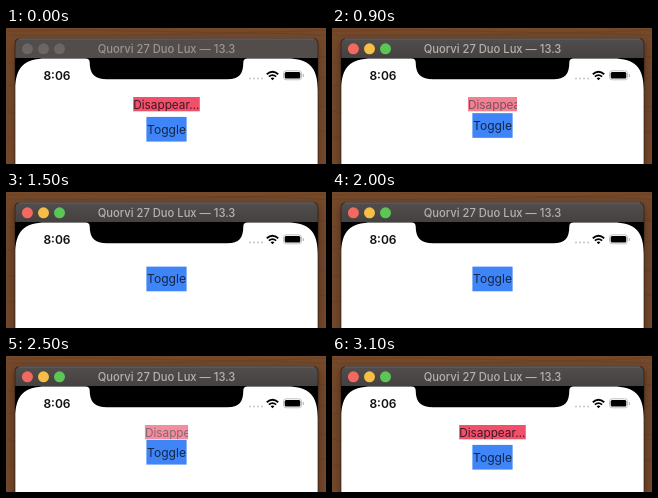
These frames come from a looping animation (320x136 px, 3300 ms). An HTML page:

```html
<!DOCTYPE html>
<html lang="en">
<head>
<meta charset="utf-8">
<title>Toggle transition</title>
<style>
  html, body { margin: 0; width: 100%; height: 100%; overflow: hidden; background: #6b4529; }
  svg { display: block; width: 100vw; height: 100vh; font-family: Inter, Roboto, sans-serif; }
  .bar { fill: #524c4a; }
  .title { fill: #9a9492; font-size: 11.2px; font-weight: 500; text-anchor: middle; }
  .light { fill: #6b6563; }
  .shadow { opacity: .2; }
  .active .bar { fill: url(#barFill); }
  .active .title { fill: #b5b1af; }
  .active .light { fill: var(--c); }
  .active .shadow { opacity: .35; }
  .clock { font-size: 12px; font-weight: 600; fill: #111; }
  .label { font-size: 11.8px; fill: #3d1a26; }
  .toggle { font-size: 12.1px; fill: #12274a; text-anchor: middle; }
</style>
</head>
<body>
<svg id="stage" viewBox="0 0 320 136" preserveAspectRatio="none">
  <defs>
    <linearGradient id="wood" x2="0" y2="1">
      <stop offset="0" stop-color="#75492a"/>
      <stop offset=".5" stop-color="#70482c"/>
      <stop offset="1" stop-color="#75492b"/>
    </linearGradient>
    <linearGradient id="barFill" x2="0" y2="1">
      <stop offset="0" stop-color="#524e4d"/>
      <stop offset="1" stop-color="#454140"/>
    </linearGradient>
    <filter id="blur" x="-10%" y="-20%" width="120%" height="140%">
      <feGaussianBlur stdDeviation="4"/>
    </filter>
    <clipPath id="labelClip"><rect id="clip" y="69" height="14.600"/></clipPath>
  </defs>

  <rect width="320" height="136" fill="url(#wood)"/>
  <g fill="none" stroke="#4c2f1c" stroke-opacity=".3" stroke-width=".8">
    <path d="M0 3Q80 1 160 3.500T320 2M0 7Q100 8 190 6T320 7.500"/>
    <path d="M0 34l9 2M0 58l9-1M0 83l9 2M0 110l9-1M312 28l8 1M312 51l8-2M312 78l8 1M312 104l8-1"/>
  </g>
  <rect class="shadow" x="8" y="13" width="305" height="140" rx="5" fill="#1c0f08" filter="url(#blur)"/>
  <rect x="8.700" y="9.900" width="303.600" height="140" rx="5.500" fill="#1b1411"/>

  <path class="bar" d="M9.300 30V15.500a5 5 0 0 1 5-5H306.700a5 5 0 0 1 5 5V30z"/>
  <path d="M13 10.900H308" stroke="#7d7674" stroke-width=".7"/>
  <g>
    <circle class="light" style="--c:#f2695f" cx="21.400" cy="20.800" r="5.500"/>
    <circle class="light" style="--c:#f6be46" cx="37.500" cy="20.800" r="5.500"/>
    <circle class="light" style="--c:#5bc655" cx="53.500" cy="20.800" r="5.500"/>
  </g>
  <text class="title" x="160.500" y="25.400">Quorvi 27 Duo Lux — 13.3</text>

  <path d="M9.300 30H311.700V136H9.300z"/>
  <path fill="#fff" d="M9.300 136V62C9.300 39 18 30.500 40 30.500H79.500Q83.700 30.500 83.700 34.500C83.700 46.300 89 51.300 101 51.300H221.500C233 51.300 237.300 46.300 237.300 34.500Q237.300 30.500 241.500 30.500H281C303 30.500 311.700 39 311.700 62V136z"/>

  <text class="clock" x="37.400" y="51.500">8:06</text>
  <g fill="#c4c4c4">
    <circle cx="244" cy="50.500" r="1"/><circle cx="248" cy="50.500" r="1"/>
    <circle cx="252" cy="50.500" r="1"/><circle cx="256" cy="50.500" r="1"/>
  </g>
  <g fill="none" stroke="#000" stroke-width="1.800">
    <path d="M260.800 46.300Q266.500 41.300 272.200 46.300M262.900 48.700Q266.500 45.500 270.100 48.700"/>
    <path d="M264.600 50.200Q266.500 48.600 268.400 50.200L266.500 52.200z" fill="#000" stroke="none"/>
    <rect x="277.500" y="42.800" width="18" height="9" rx="2.600" stroke="#bbb" stroke-width=".9"/>
    <path d="M297.300 46v3" stroke="#bbb" stroke-width="1.200"/>
  </g>
  <rect x="278.700" y="44" width="15.600" height="6.600" rx="1.500"/>

  <g id="banner" clip-path="url(#labelClip)">
    <rect x="120" y="69" width="80" height="14.600" fill="#f2506a"/>
    <text id="label" class="label" y="80.500">Disappear…</text>
  </g>
  <g id="button">
    <rect x="140.400" width="40.200" height="24.700" fill="#3f85f7"/>
    <text class="toggle" x="160.500" y="16.900">Toggle</text>
  </g>
</svg>
<script>
  const LOOP = 3300, TICK = 100, MOVE = 700;
  const HIDE = 665, SHOW = 2080, ACTIVATE = 600;
  const CENTER = 160.5, WIDTH = 66.6;
  const $ = id => document.getElementById(id);
  const stage = $('stage'), clip = $('clip'), banner = $('banner');
  const label = $('label'), button = $('button');

  function ease(time, start) {
    const x = Math.min(1, Math.max(0, (time - start) / MOVE));
    return x * x * (3 - 2 * x);
  }

  function draw(now) {
    const time = Math.floor(now % LOOP / TICK) * TICK;
    const shown = 1 - ease(time, HIDE) + ease(time, SHOW);
    const width = WIDTH * shown;
    const left = CENTER - width / 2;
    stage.classList.toggle('active', time >= ACTIVATE);
    clip.setAttribute('x', left);
    clip.setAttribute('width', width);
    label.setAttribute('x', left);
    banner.setAttribute('opacity', shown);
    button.setAttribute('transform', `translate(0 ${74.6 + 14.3 * shown})`);
  }

  const begin = performance.now();
  function loop() {
    draw(performance.now() - begin);
    requestAnimationFrame(loop);
  }
  loop();
</script>
</body>
</html>
```
